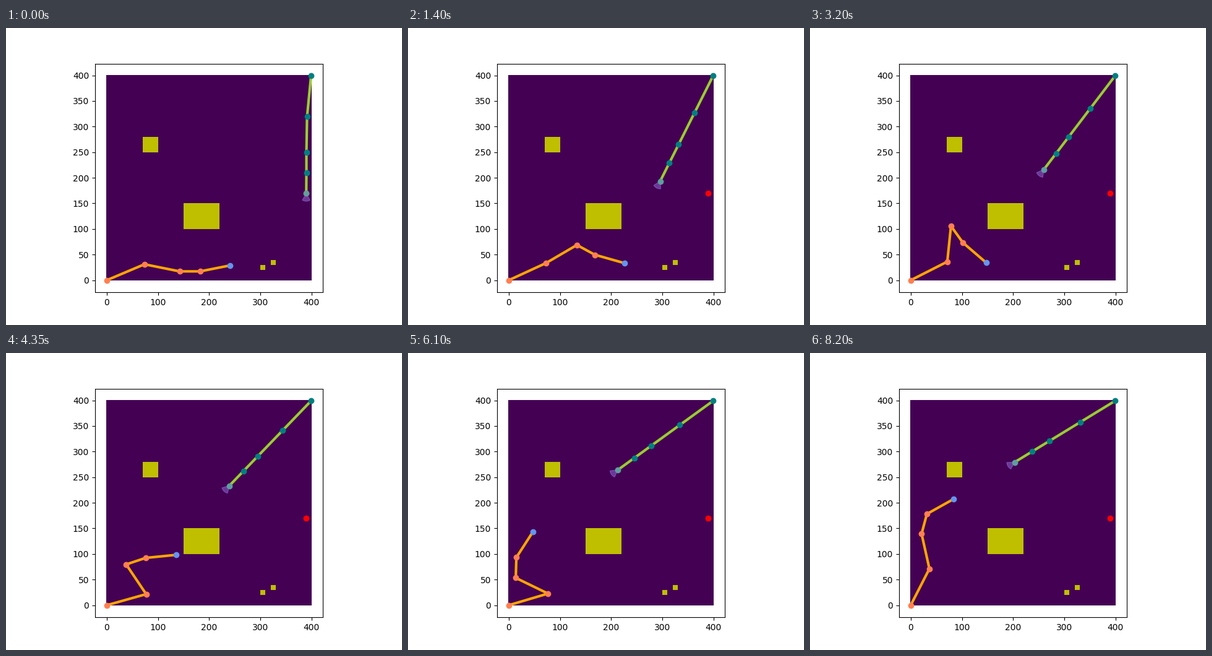
A matplotlib script for the animation above (8.25 s loop, 640 by 480 pixels).

```python
import numpy as np
import matplotlib.pyplot as plt
from matplotlib.animation import FuncAnimation
from matplotlib.patches import Rectangle, Wedge

FRAMES, STEP_MS = 165, 50


def linear(t, start, end, turn):
    return turn * np.clip((t - start) / (end - start), 0, 1)


def smooth(t, start, end, turn):
    u = linear(t, start, end, 1)
    return turn * u * u * (3 - 2 * u)


def lower_angles(t):
    """Link angles in degrees: fold back, swing over, then stretch up."""
    return np.array([
        22.9 + smooth(t, 0, 60, 4) + smooth(t, 64, 108, -21) + smooth(t, 106, 164, 57),
        -11.4 + linear(t, 0, 108, 161) + smooth(t, 62, 108, 10) + smooth(t, 112, 164, -57),
        linear(t, 0, 54, -55) + smooth(t, 62, 112, 147) + smooth(t, 104, 164, -17),
        11.2 + linear(t, 0, 54, -52) + smooth(t, 63, 114, 102) + smooth(t, 110, 164, -32),
    ])


def upper_angles(t):
    """Straighten quickly, sweep at a steady rate, then settle at a limit."""
    sweep = -np.logaddexp(-(18.7 + 0.29 * t), -58.6)
    slack = np.array([13.1, 17.7, 18.7, 18.2]) * np.exp(-t / 6)
    return 270 - sweep + slack


class Arm:
    def __init__(self, ax, base, links, angles, line, joint, tip):
        self.base, self.links, self.angles = np.array(base), np.array(links), angles
        self.bones, = ax.plot([], [], color=line, lw=3)
        self.joints, = ax.plot([], [], "o", color=joint)
        self.tip, = ax.plot([], [], "o", color=tip)

    def pose(self, t):
        degrees = self.angles(t)
        a = np.radians(degrees)
        steps = self.links[:, None] * np.column_stack([np.cos(a), np.sin(a)])
        pts = np.vstack([self.base, self.base + np.cumsum(steps, axis=0)])
        self.bones.set_data(*pts.T)
        self.joints.set_data(*pts[:-1].T)
        self.tip.set_data(*pts[-1:].T)
        return pts[-1], degrees[-1]


fig, ax = plt.subplots(figsize=(6.4, 4.8), dpi=100)
ax.imshow(np.zeros((400, 400)), cmap="viridis", origin="lower",
          extent=(-0.5, 400, -0.5, 400))
ax.set(xlim=(-22.9, 422.1), ylim=(-23.65, 422.95),
       xticks=range(0, 401, 100), yticks=range(0, 401, 50))
for x, y, w, h in [(70, 250, 30, 30), (150, 100, 70, 50),
                   (300, 20, 10, 10), (320, 30, 10, 10)]:
    ax.add_patch(Rectangle((x, y), w, h, color="y", lw=0))

ax.plot(389, 170, "o", color="red")
lower = Arm(ax, (0, 0), (80, 70, 40, 60), lower_angles,
            "orange", "coral", "cornflowerblue")
upper = Arm(ax, (399, 399), (80, 70, 40, 40), upper_angles,
            "yellowgreen", "teal", "cadetblue")
cone = ax.add_patch(Wedge((0, 0), 15, 0, 60, color="mediumpurple", alpha=0.5))


def update(i):
    lower.pose(i)
    tip, heading = upper.pose(i)
    cone.set_center(tip)
    cone.set_theta1(heading - 30)
    cone.set_theta2(heading + 30)
    return []


anim = FuncAnimation(fig, update, frames=FRAMES, interval=STEP_MS,
                     repeat=True, repeat_delay=0, blit=False)
plt.show()
```
